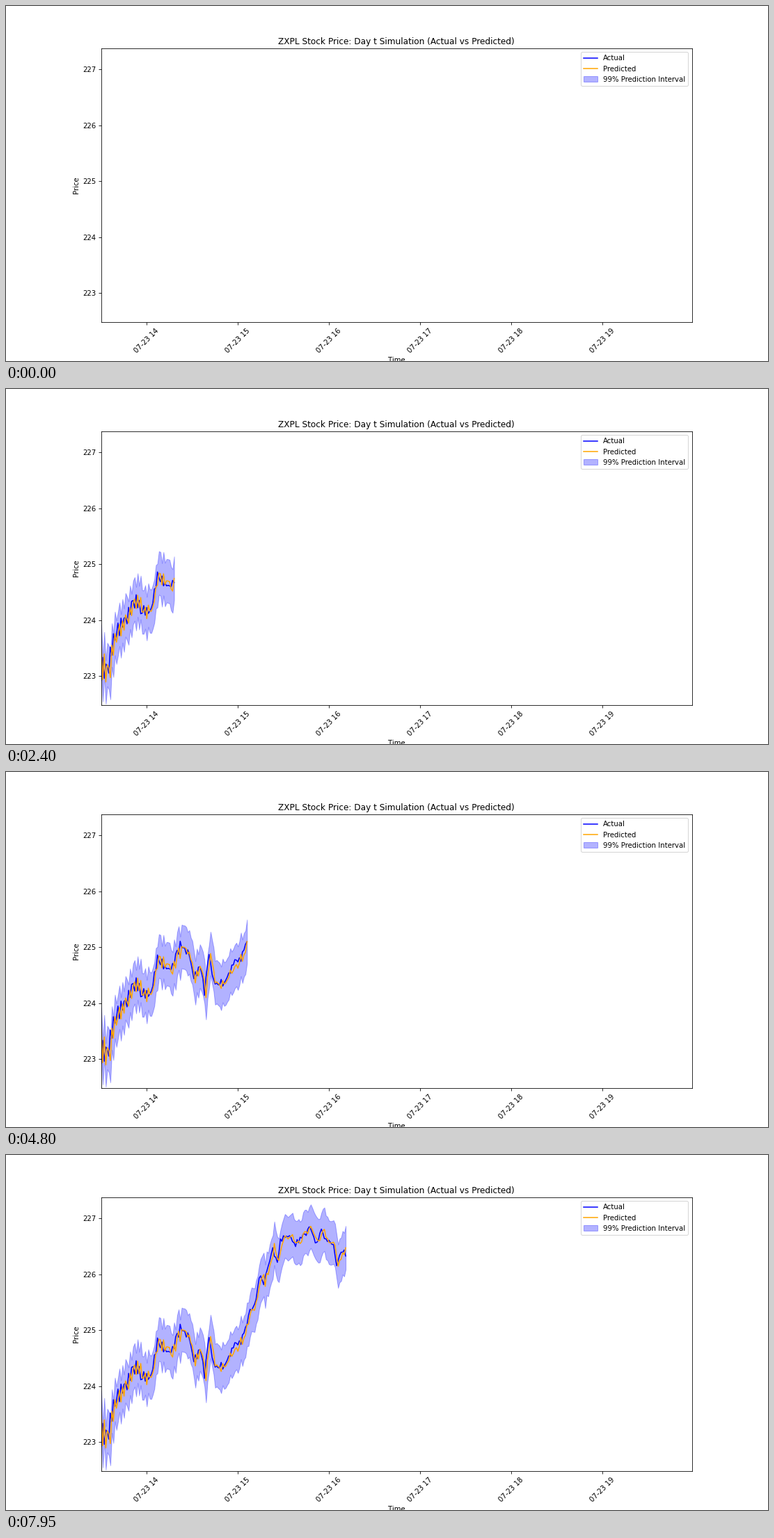
Recreate the animation shown at these times as a matplotlib script. Size 1095 by 511 pixels, loop 8 s.

```python
import numpy as np
import matplotlib.pyplot as plt
from matplotlib.animation import FuncAnimation

FRAMES, INTERVAL = 160, 50
Y_MIN, Y_MAX = 222.484, 227.375
HALF_BAND = 0.39
FIRST_FORECAST = 223.58
NO_TRADE = [100, 106]

# Turning points of the day: (minute after opening, price)
TREND = [
    (0, 223.1), (5, 223.2), (8, 223.65), (13, 223.93), (17, 224.07),
    (20, 224.35), (24, 224.33), (27, 224.18), (33, 224.2), (37, 224.8),
    (44, 224.6), (47, 224.65), (52, 225.05), (58, 224.85), (61, 224.47),
    (65, 224.68), (68, 224.22), (71, 224.93), (74, 224.35), (81, 224.35),
    (87, 224.72), (92, 224.78), (96, 225.13), (98, 225.42), (101, 225.47),
    (105, 226.0), (107, 225.85), (113, 226.45), (116, 226.22), (118, 226.62),
    (125, 226.72), (127, 226.55), (138, 226.82), (142, 226.53), (145, 226.84),
    (148, 226.6), (153, 226.55), (155, 226.16), (158, 226.45), (161, 226.35),
]


def build_series():
    rng = np.random.default_rng(7)
    minute = np.delete(np.arange(FRAMES + len(NO_TRADE)), NO_TRADE)
    # The opening is choppy; the ripple dies away during the first hour
    ripple = 0.21 * np.exp(-minute / 40) * np.cos(2 * np.pi * (minute - 1) / 2.43)
    actual = np.interp(minute, *zip(*TREND)) + ripple
    actual += rng.normal(0, 0.035, FRAMES)
    # The forecast trails the last price by one step
    predicted = np.r_[FIRST_FORECAST, actual[:-1]] + rng.normal(0, 0.045, FRAMES)
    predicted = predicted.clip(Y_MIN + HALF_BAND, Y_MAX - HALF_BAND)
    return minute, actual, predicted


x, actual, predicted = build_series()
lower, upper = predicted - HALF_BAND, predicted + HALF_BAND

fig, ax = plt.subplots(figsize=(15, 7), dpi=73)
actual_line, = ax.plot([], [], color="blue", label="Actual")
predicted_line, = ax.plot([], [], color="orange", label="Predicted")
band = ax.fill_between(x, lower, upper, color="blue", alpha=0.3,
                       label="99% Prediction Interval")
ax.set_xlim(0, 389)
ax.set_ylim(Y_MIN, Y_MAX)
ax.set_xticks(range(30, 389, 60), [f"07-23 {h}" for h in range(14, 20)],
              rotation=45)
ax.set_yticks(range(223, 228))
ax.set_title("ZXPL Stock Price: Day t Simulation (Actual vs Predicted)")
ax.set_xlabel("Time")
ax.set_ylabel("Price")
ax.legend(loc="upper right")


def update(frame):
    n = frame + 1 if frame else 0
    actual_line.set_data(x[:n], actual[:n])
    predicted_line.set_data(x[:n], predicted[:n])
    outline = np.column_stack([np.r_[x[:n], x[:n][::-1]],
                               np.r_[lower[:n], upper[:n][::-1]]])
    band.set_verts([outline] if n else [])
    return band, actual_line, predicted_line


anim = FuncAnimation(fig, update, frames=FRAMES, interval=INTERVAL,
                     repeat=True, repeat_delay=0)
plt.show()
```
